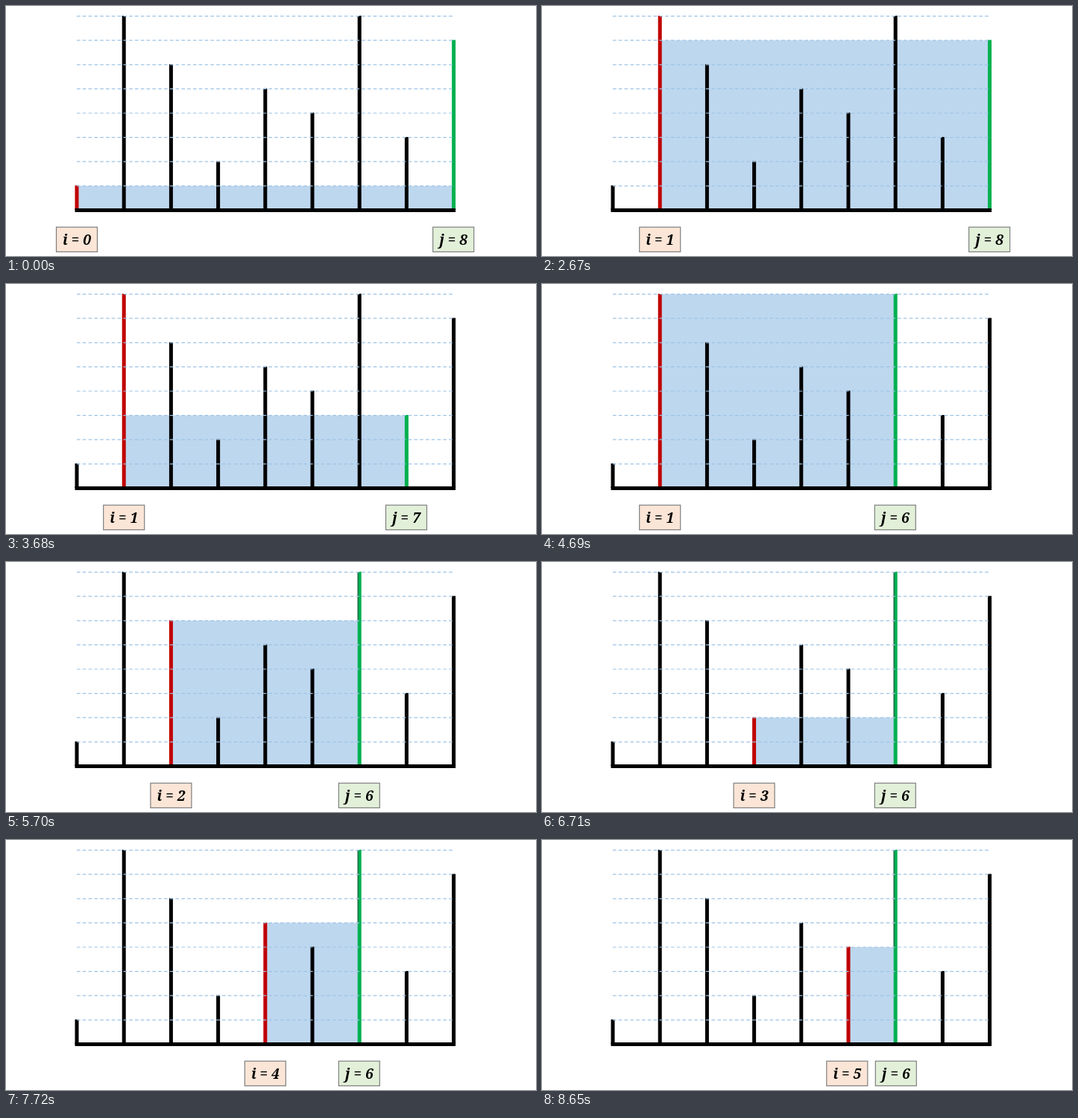
An HTML page for the animation above (9200 ms loop, 711 by 336 pixels).

```html
<!DOCTYPE html>
<html lang="en">
<head>
<meta charset="utf-8">
<title>Two pointers, container with most water</title>
<style>
  html, body { margin: 0; width: 100%; height: 100%; overflow: hidden; background: #fff; }
  svg { display: block; }
  text { font: italic bold 19px "Noto Serif", serif; text-anchor: middle; }
  .label rect { stroke: #7f7f7f; stroke-width: 1.2; }
  .grid { stroke: #9dc3e6; stroke-width: 1.2; stroke-dasharray: 4.6 3.2; }
</style>
</head>
<body>
<svg id="stage" width="711" height="336" viewBox="0 0 711 336"></svg>
<script>
const LOOP = 9200;
const HEIGHTS = [1, 8, 6, 2, 5, 4, 8, 3, 7];
const FLOOR = 274.4, BAR = 5;
const RED = '#c00000', GREEN = '#00b050';

// start time, left pointer, right pointer
const STEPS = [
  [0, 0, 8], [2670, 1, 8], [3680, 1, 7], [4690, 1, 6],
  [5700, 2, 6], [6710, 3, 6], [7720, 4, 6], [8650, 5, 6]
];

const stage = document.getElementById('stage');
const barX = n => 95 + 63.2 * n;
const levelY = h => FLOOR - 32.6 * h;

function set(el, attrs) {
  for (const key in attrs) el.setAttribute(key, attrs[key]);
  return el;
}

function add(tag, attrs, parent = stage) {
  const el = document.createElementNS('http://www.w3.org/2000/svg', tag);
  return parent.appendChild(set(el, attrs));
}

function addLabel(fill) {
  const group = add('g', { class: 'label' });
  add('rect', { x: -27.5, y: 297.2, width: 55, height: 33.2, fill }, group);
  return { group, text: add('text', { x: 0, y: 320.6 }, group) };
}

function moveLabel(label, name, n, nudge) {
  label.group.setAttribute('transform', `translate(${barX(n) + nudge} 0)`);
  label.text.textContent = `${name} = ${n}`;
}

const water = add('rect', { fill: '#bdd7ee' });
const bars = HEIGHTS.map((h, n) => {
  const top = levelY(h) - 0.6;
  return add('rect', { x: barX(n) - BAR / 2, y: top, width: BAR, height: FLOOR - top });
});
const edge = add('rect', { x: barX(6) - BAR / 2, y: 13, width: 0.8, fill: '#333' });
for (let h = 1; h <= 8; h++) {
  add('line', { class: 'grid', x1: 95, x2: 599, y1: levelY(h), y2: levelY(h) });
}
add('rect', { x: 92.5, y: 272, width: 510.6, height: BAR });
const left = addLabel('#fbe5d6');
const right = addLabel('#e2f0d9');

function show([, i, j]) {
  const top = levelY(Math.min(HEIGHTS[i], HEIGHTS[j]));
  const x = barX(i);
  set(water, { x, y: top, width: barX(j) - x, height: FLOOR - top });
  bars.forEach((bar, n) => bar.setAttribute('fill', n === i ? RED : n === j ? GREEN : '#000'));
  edge.setAttribute('height', i > 1 ? top - 13 : 0);
  // the pair spreads slightly when the pointers are neighbours
  const close = j - i === 1;
  moveLabel(left, 'i', i, close ? -1.7 : 0);
  moveLabel(right, 'j', j, close ? 0.6 : -0.4);
}

let current;
function tick() {
  const t = performance.now() % LOOP;
  const step = STEPS.findLast(s => s[0] <= t);
  if (step !== current) show(current = step);
  requestAnimationFrame(tick);
}
tick();
</script>
</body>
</html>
```
